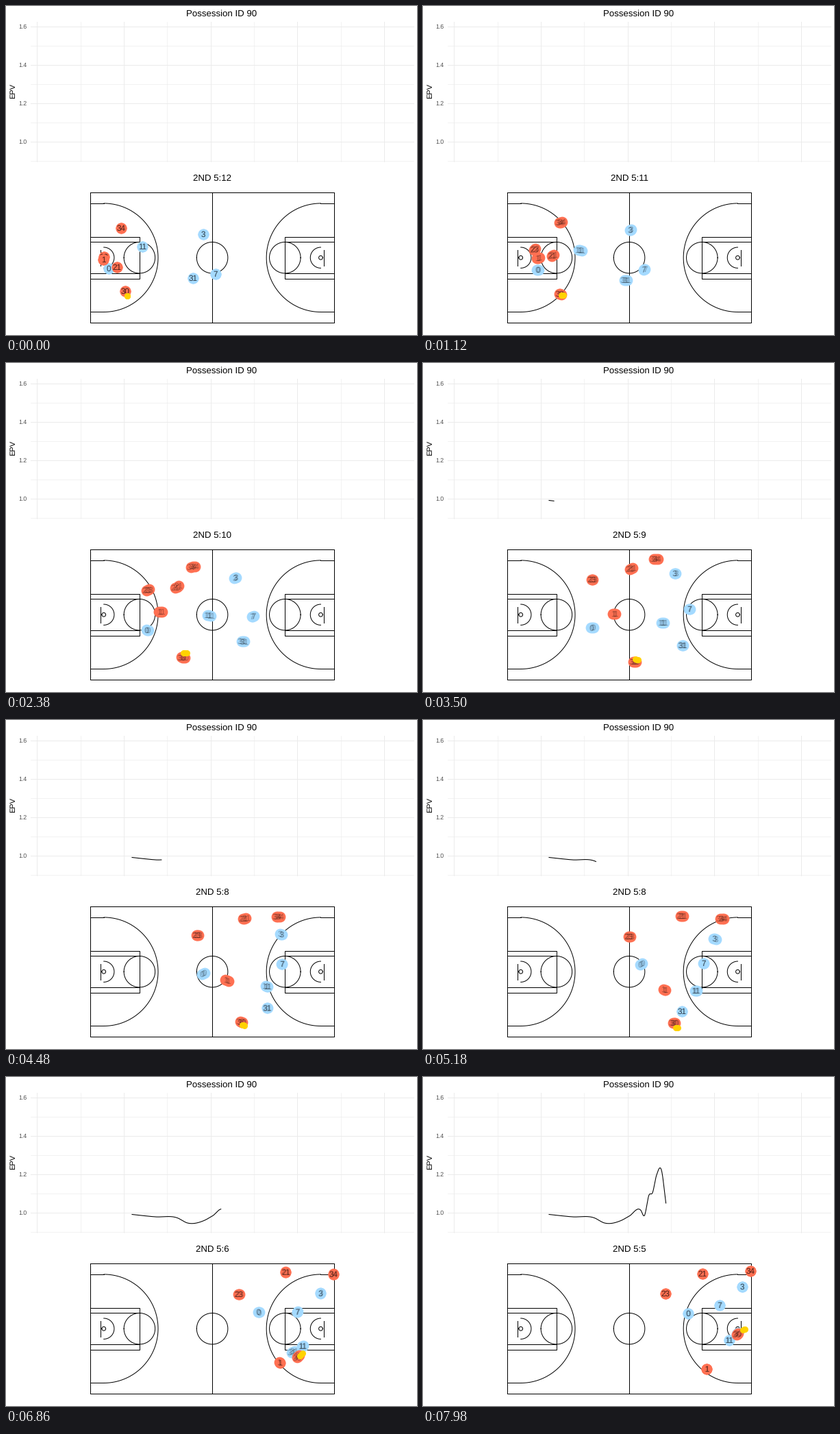
A matplotlib script for the animation above (8 s loop, 600 by 480 pixels).

```python
import numpy as np
import matplotlib.pyplot as plt
from matplotlib.animation import FuncAnimation

W, H, DPI = 600, 480, 100
PT = 72 / DPI                      # points per pixel
plt.rcParams["font.family"] = "Liberation Sans"
plt.rcParams["text.hinting"] = "none"

TICK, STEP_MS, LOOP_MS = 40, 140, 8000
LAST = LOOP_MS // STEP_MS          # steps in one loop
RED, BLUE, GOLD = "#FF7052", "#A4DAFF", "#FFD200"
GRID = "#EBEBEB"

# Each run: start, crossing half court, setting up, finish
RUN_STEPS = np.array([0, 25, 42, LAST])
AWAY = {
    "3": [(288, 333), (368, 307), (445, 322), (466, 306)],
    "7": [(306, 391), (389, 359), (416, 352), (433, 333)],
    "0": [(150, 383), (247, 386), (344, 346), (387, 345)],
    "31": [(273, 397), (379, 412), (384, 423), (459, 374)],
    "11": [(199, 351), (350, 379), (414, 398), (447, 384)],
}
HOME = {
    "34": [(168, 324), (340, 286), (465, 291), (478, 283)],
    "23": [(143, 366), (247, 316), (320, 317), (354, 316)],
    "21": [(162, 381), (304, 300), (399, 284), (408, 287)],
    "1": [(142, 370), (279, 366), (377, 405), (414, 426)],
    "30": [(174, 416), (309, 436), (390, 436), (459, 375)],
}
# Turning points of the expected value curve
EPV = [(184, 200.5), (218, 204), (250, 205.5), (265, 213), (289, 209.5),
       (301, 203), (318, 194.5), (323, 202.5), (330, 172), (335, 169),
       (341, 143), (348, 135.5), (354.6, 184)]


def smooth(keys, points, ends=1.0):
    """Cubic Hermite curve through points; `ends` scales the end slopes."""
    k, v = np.array(keys, float), np.array(points, float)
    m = np.gradient(v, k, axis=0)
    m[[0, -1]] *= ends

    def at(t):
        i = np.clip(np.searchsorted(k, t, "right") - 1, 0, len(k) - 2)
        h = (k[i + 1] - k[i])[:, None]
        u = (t - k[i])[:, None] / h
        return (v[i] * (1 + 2 * u) * (1 - u) ** 2 + v[i + 1] * u * u * (3 - 2 * u)
                + h * u * (1 - u) * (m[i] * (1 - u) - m[i + 1] * u))
    return at


def pace(step):
    """Standing start that settles into even speed."""
    s = np.maximum(step, 0)
    return s * s / (s + 3)


def run(points):
    curve = smooth(pace(RUN_STEPS), points, 0.5)
    return lambda step: curve(pace(step))


def dribble(carrier):
    """The ball swings around its carrier and leaves the hand at the end."""
    def at(step):
        reach = 3 + 6.5 * (step / LAST) ** 8
        swing = 7 * np.cos(0.17 * step)
        return carrier(step) + np.column_stack([reach, swing])
    return at


fig = plt.figure(figsize=(W / DPI, H / DPI), dpi=DPI, facecolor="white")
ax = fig.add_axes([0, 0, 1, 1])
ax.set_xlim(0, W)
ax.set_ylim(H, 0)
ax.axis("off")


def stroke(x, y, color="black", px=1.0, **kw):
    return ax.plot(x, y, color=color, lw=px * PT, **kw)[0]


def label(x, y, s, px, **kw):
    kw = {"ha": "center", "va": "baseline", **kw}
    return ax.text(x, y, s, fontsize=px * PT, **kw)


def draw_chart():
    for i in range(4):
        y = 30 + 56 * i
        stroke([36, 595], [y + 28] * 2, GRID, 0.6)
        stroke([36, 595], [y, y], GRID)
        label(30.8, y + 3, f"{1.6 - 0.2 * i:.1f}", 8.8, ha="right", color="#4D4D4D")
    for i in range(9):
        x = 45.3 + 63.35 * i
        stroke([x, x], [23, 227], GRID, 0.6 if i % 2 else 1)
    label(315, 15, "Possession ID 90", 13.2)
    label(10, 124, "EPV", 11, va="center", rotation=90)


def draw_court():
    cx, cy, ft = 301.1, 367.2, 3.793
    half_turn = np.radians(np.linspace(-90, 90, 91))

    def line(x, y, side=1):
        stroke(cx + side * (np.array(x) - 47) * ft, cy + np.array(y) * ft)

    def arc(x, r, turn=half_turn, side=1):
        line(x + r * np.cos(turn), r * np.sin(turn), side)

    def box(x, half, side=1):
        line([0, x, x, 0, 0], [-half, -half, half, half, -half], side)

    box(94, 25)
    line([47, 47], [-25, 25])
    arc(47, 6, 2 * half_turn)
    hoop, three = 5.25, 20.9
    for side in (1, -1):
        box(19, 8, side)
        box(19, 6, side)
        arc(19, 6, 2 * half_turn, side)
        arc(hoop, 0.75, 2 * half_turn, side)
        arc(hoop, 4, side=side)
        line([4, 4], [-3, 3], side)
        arc(hoop, three, side=side)
        for y in (-three, three):
            line([0, hoop], [y, y], side)


class Dot:
    """A marker drawn at three close moments, with its number on top."""
    def __init__(self, path, color, size, z, name=""):
        self.path = path
        self.marks = ax.plot([], [], "o", color=color, ms=size * PT, mew=0,
                             zorder=z, snap=False)[0]
        self.names = [label(0, 0, name, 11.6, alpha=0.3, zorder=z + 0.5)
                      for _ in range(3 if name else 0)]

    def move(self, steps):
        spots = self.path(steps)
        self.marks.set_data(*spots.T)
        for text, (x, y) in zip(self.names, spots):
            text.set_position((x, y + 4))


draw_chart()
draw_court()
clock = label(301, 254.5, "", 13.2)
epv = stroke([], [], px=1.07, zorder=3)
epv_x, epv_y = np.transpose(EPV)
epv_at = smooth(epv_x, epv_y[:, None])

dots = []
for team, color in ((AWAY, BLUE), (HOME, RED)):
    for name, points in team.items():
        dots.append(Dot(run(points), color, 15.8, 10 + len(dots), name))
dots.append(Dot(dribble(run(HOME["30"])), GOLD, 9, 40))


def update(i):
    step = (i * TICK + TICK // 2) // STEP_MS
    for dot in dots:
        dot.move(step + np.array([-1, 0, 1]) / 3)
    clock.set_text(f"2ND 5:{11 - int(np.floor((step - 4) / 8.33))}")
    end = epv_x[-1] + (step - LAST) * 5.11
    x = np.linspace(epv_x[0], end, 200 if end > epv_x[0] else 0)
    epv.set_data(x, epv_at(x)[:, 0])
    return [clock, epv]


anim = FuncAnimation(fig, update, frames=LOOP_MS // TICK, interval=TICK,
                     repeat=True, repeat_delay=0, blit=False)
plt.show()
```
